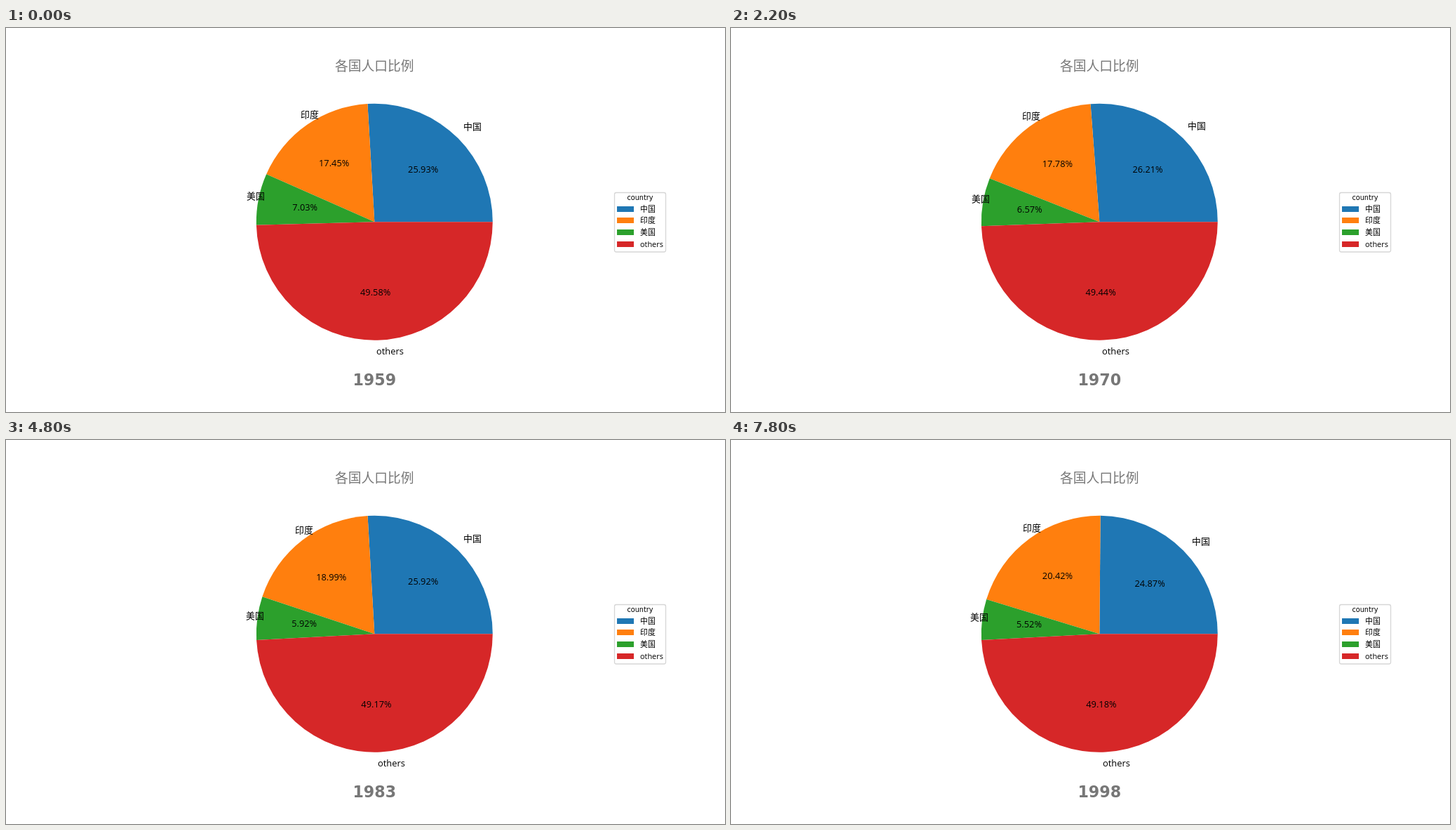
These frames come from a looping animation (1025 px wide and 547 px high, 8 s). An HTML page with a canvas:

```html
<!DOCTYPE html>
<html lang="zh-CN">
<head>
<meta charset="utf-8">
<style>
  html, body { margin: 0; width: 100%; height: 100%; overflow: hidden; background: #fff; }
  canvas { display: block; }
</style>
</head>
<body>
<canvas id="stage" width="1025" height="547"></canvas>
<script>
const W = 1025, H = 547;
const ctx = document.getElementById('stage').getContext('2d');
const FIRST_YEAR = 1959, YEARS = 40, STEP_MS = 200;
const CX = W * 0.5125, CY = H * 0.505, RADIUS = H * 0.308;
const SANS = '"Open Sans", "Noto Sans CJK SC", "Noto Sans CJK", "Noto Sans", sans-serif';
const DEJAVU = '"DejaVu Sans", sans-serif';
const GREY = '#777';

// Each trend is a curve through a few [year offset, millions] points.
const SLICES = [
  { name: '中国', color: '#1f77b4', trend: [[0, 655.9], [1, 667], [2, 660.3], [3, 665.8],
    [7, 735.4], [11, 818.3], [15, 900.4], [20, 969], [24, 1023.3], [34, 1178.4], [39, 1241.9]] },
  { name: '印度', color: '#ff7f0e', trend: [[0, 441.4], [7, 509.6], [11, 555.2], [20, 683],
    [24, 749.43], [34, 927.4], [39, 1019.5]] },
  { name: '美国', color: '#2ca02c', trend: [[0, 177.83], [3, 186.54], [7, 196.56], [11, 205.05],
    [20, 225.06], [24, 233.8], [34, 259.92], [39, 275.85]] },
  { name: 'others', color: '#d62728', trend: [[0, 1254], [7, 1433.75], [11, 1543.6], [20, 1807.6],
    [24, 1940.8], [34, 2291], [39, 2455.7]] }
];

// Cubic Hermite curve through the points.
function curve(points, x) {
  const last = points.length - 1;
  const slope = (a, b) => (points[b][1] - points[a][1]) / (points[b][0] - points[a][0]);
  const tangent = i => slope(Math.max(i - 1, 0), Math.min(i + 1, last));
  let i = 0;
  while (i < last - 1 && x > points[i + 1][0]) i++;
  const [x0, y0] = points[i], [x1, y1] = points[i + 1];
  const h = x1 - x0, t = (x - x0) / h, u = 1 - t;
  return y0 * u * u * (1 + 2 * t) + y1 * t * t * (3 - 2 * t)
    + h * t * u * (u * tangent(i) - t * tangent(i + 1));
}

function sharesFor(step) {
  const values = SLICES.map(slice => curve(slice.trend, step));
  const total = values.reduce((a, b) => a + b);
  return values.map(v => v / total);
}

function text(str, x, y, font, align = 'left', color = '#000') {
  ctx.font = font;
  ctx.textAlign = align;
  ctx.fillStyle = color;
  ctx.fillText(str, x, y);
}

function drawPie(shares) {
  const mids = [];
  let start = 0;
  shares.forEach((share, i) => {
    const end = start + share * 2 * Math.PI;
    mids.push((start + end) / 2);
    ctx.fillStyle = SLICES[i].color;
    ctx.beginPath();
    ctx.moveTo(CX, CY);
    ctx.arc(CX, CY, RADIUS, -start, -end, true);
    ctx.fill();
    start = end;
  });
  mids.forEach((mid, i) => {
    const x = k => CX + k * RADIUS * Math.cos(mid);
    const y = k => Math.round(CY - k * RADIUS * Math.sin(mid) + 3.5);
    text(SLICES[i].name, Math.round(x(1.1)), y(1.1), '12.9px ' + SANS);
    text((shares[i] * 100).toFixed(2) + '%', x(0.6), y(0.6), '12.8px ' + SANS, 'center');
  });
}

function drawLegend() {
  ctx.strokeStyle = '#d6d6d6';
  ctx.lineWidth = 1.3;
  ctx.beginPath();
  ctx.roundRect(867.5, 234.5, 73, 84.5, 2.5);
  ctx.stroke();
  text('country', 904, 245, '9.72px ' + DEJAVU, 'center');
  SLICES.forEach(({ name, color }, i) => {
    const y = Math.floor(254 + i * 16.7);
    ctx.fillStyle = color;
    ctx.fillRect(871, y, 24, 8);
    text(name, 904, y + 8, '10.9px ' + SANS);
  });
}

function draw(now) {
  const step = Math.floor(now / STEP_MS) % YEARS;
  ctx.fillStyle = '#fff';
  ctx.fillRect(0, 0, W, H);
  text('各国人口比例', CX, 61, '18.75px ' + SANS, 'center', GREY);
  drawPie(sharesFor(step));
  drawLegend();
  text(FIRST_YEAR + step, CX, 509, 'bold 22.2px ' + DEJAVU, 'center', GREY);
}

let origin;
function tick(now) {
  origin ??= now;
  draw(Math.max(0, now - origin));
  requestAnimationFrame(tick);
}
draw(0);
requestAnimationFrame(tick);
</script>
</body>
</html>
```
